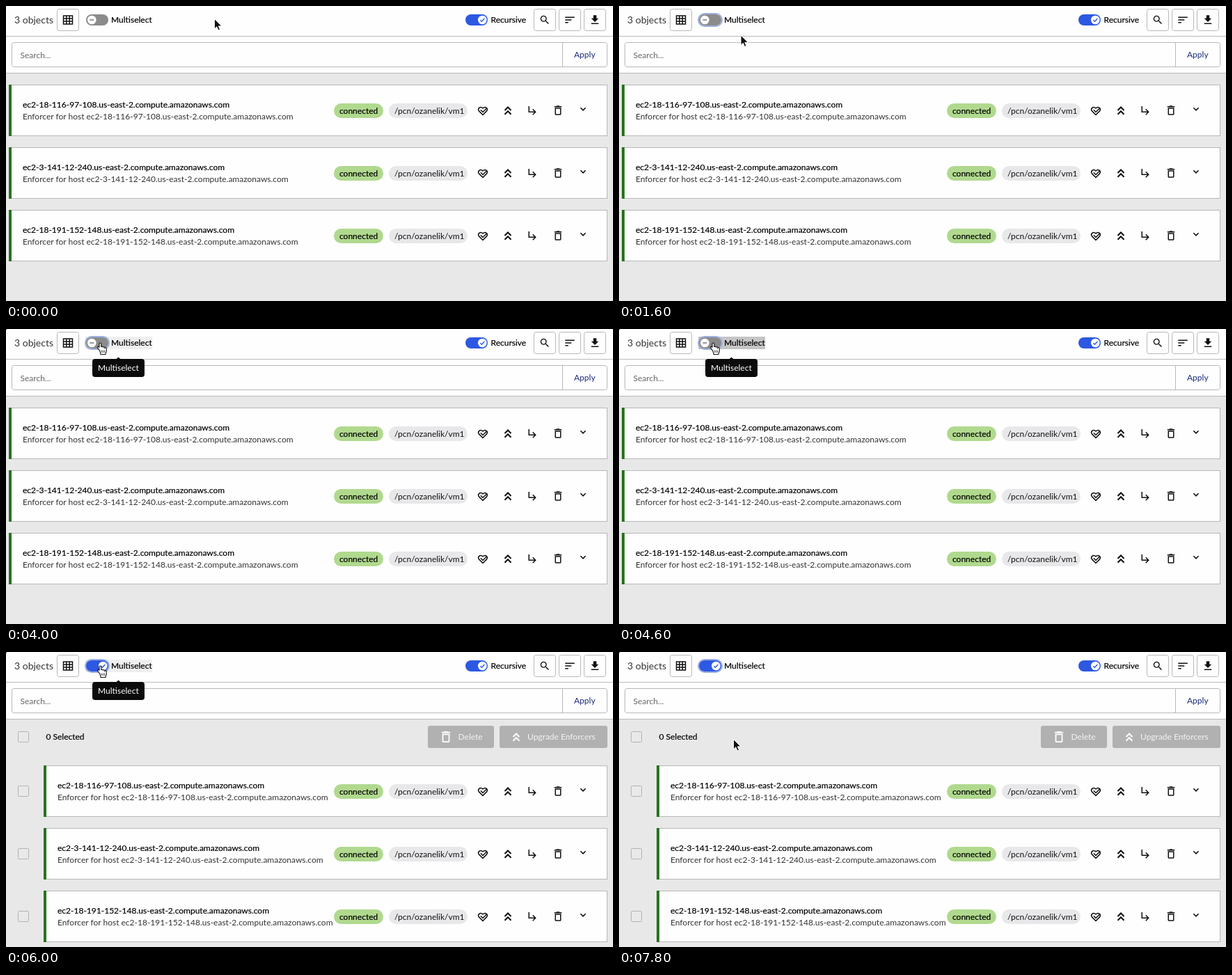
Animation of 872x424 px, one loop 8 s. Source, as an HTML page:

```html
<!DOCTYPE html>
<html lang="en">
<head>
<meta charset="utf-8">
<title>Multiselect toggle</title>
<style>
  html, body { margin: 0; width: 100%; height: 100%; overflow: hidden; background: #e8e8e8; }
  svg { display: block; width: 872px; height: 424px; }
  text { font: 12px Lato, sans-serif; white-space: pre; }
  .strong { stroke: #000; stroke-width: .2; }
  .line { fill: none; stroke: #111; }
  .box { fill: #fefefe; stroke: #b8b8b8; }
</style>
</head>
<body>
<svg id="stage" viewBox="0 0 872 424"></svg>
<script>
const LOOP = 8000, STEP = 200;

const ICONS = {
  search: 'M15.5 14h-.79l-.28-.27A6.47 6.47 0 0 0 16 9.5 6.5 6.5 0 1 0 9.5 16c1.61 0 3.09-.59 4.23-1.57l.27.28v.79l5 4.99L20.49 19l-4.99-5zm-6 0C7.01 14 5 11.99 5 9.5S7.01 5 9.5 5 14 7.01 14 9.5 11.99 14 9.5 14z',
  sort: 'M3 18h6v-2H3zM3 6v2h18V6zM3 13h12v-2H3z',
  download: 'M19 9h-4V3H9v6H5l7 7zM5 18v2h14v-2z',
  enter: 'M19 15l-6 6-1.42-1.42L15.17 16H4V4h2v10h9.17l-3.59-3.58L13 9z',
  trash: 'M16 9v10H8V9h8m-1.5-6h-5l-1 1H5v2h14V4h-3.5zM18 7H6v12c0 1.1.9 2 2 2h8c1.1 0 2-.9 2-2z'
};

const icon = (name, x, y, scale = .75, color = '#111') =>
  `<path d="${ICONS[name]}" fill="${color}" transform="translate(${x} ${y}) scale(${scale}) translate(-12 -12)"/>`;
const stroke = (d, x, y, width = 1.5, color = '#111') =>
  `<path d="${d}" class="line" style="stroke:${color}" stroke-width="${width}" transform="translate(${x} ${y})"/>`;
const rect = (x, y, w, h, r, attrs) =>
  `<rect x="${x}" y="${y}" width="${w}" height="${h}" rx="${r}" ${attrs}/>`;
const fill = (x, y, w, h, r, color) => rect(x, y, w, h, r, `fill="${color}"`);
const box = (x, y, w, h, r = 3) => rect(x + .5, y + .5, w - 1, h - 1, r, 'class="box"');
const label = (s, x, y, color = '#333') => `<text x="${x}" y="${y}" fill="${color}">${s}</text>`;
const strong = (s, x, y) => `<text x="${x}" y="${y}" class="strong">${s}</text>`;
const group = (id, body) => `<g id="${id}">${body}</g>`;

const DOUBLE_UP = 'M-4.5 0L0-4.5 4.5 0M-4.5 5.7L0 1.2 4.5 5.7';
const HEART = 'M0 6L-5.6.4C-8-2.6-4-7.2 0-3.6 4-7.2 8-2.6 5.6.4ZM-3.2-1.2L0 2 5-3';

const toggleOn = x => fill(x, 12, 32, 16, 8, '#2d58e2') +
  `<circle cx="${x + 24.3}" cy="20" r="6.3" fill="#fff"/>` +
  stroke('M-3 .2L-.9 2.2 3-2', x + 24.3, 20, 1.4, '#2d58e2');
const toggleOff = x => fill(x, 12, 32, 16, 8, '#8b8b8b') +
  `<circle cx="${x + 8.3}" cy="20" r="6.3" fill="#fff"/>` +
  stroke('M-3 0H3', x + 8.3, 20, 1.5, '#777');

function header() {
  return fill(0, 0, 872, 96, 0, '#fefefe') +
    fill(0, 43, 872, 1, 0, '#bcbcbc') + fill(0, 96, 872, 1, 0, '#b8b8b8') +
    `<text x="12" y="25" fill="#333" style="font-size:14px">3 objects</text>` +
    box(73, 4, 32, 32) +
    stroke('M-6.5-6H6.5V6H-6.5ZM-6.5-2H6.5M-6.5 2H6.5M-2.2-6V6M2.2-6V6', 89, 20, 1.5) +
    toggleOn(660) + strong('Recursive', 696.5, 24) +
    [758, 794, 830].map(x => box(x, 4, 32, 32)).join('') +
    icon('search', 774, 20, .7) + icon('sort', 810, 20) + icon('download', 846, 20) +
    box(8, 52, 856, 36) + fill(799, 53, 1, 34, 0, '#b8b8b8') +
    label('Search...', 20.5, 75, '#666') + label('Apply', 816, 74, '#1c2b7c');
}

function card(ip, i) {
  const y = 113 + 90 * i, mid = y + 37;
  const host = `ec2-${ip}.us-east-2.compute.amazonaws.com`;
  return `<g class="panel">${rect(.5, y + .5, 0, 73, 0, 'class="box"')}${fill(0, y, 4, 74, 0, '#27731f')}` +
    strong(host, 20, y + 33) + label('Enforcer for host ' + host, 20, y + 50) + '</g>' +
    fill(471, y + 27, 71, 21, 10.5, '#b0d98e') + strong('connected', 479, y + 42) +
    fill(550, y + 27, 113, 21, 10.5, '#e8e8ea') + label('/pcn/ozanelik/vm1', 558, y + 42, '#111') +
    stroke(HEART, 685, mid + .5, 1.5) + stroke(DOUBLE_UP, 721, mid, 2.1) +
    icon('enter', 756.5, mid) + icon('trash', 793, mid) +
    stroke('M-3.6-1.8L0 1.8 3.6-1.8', 829, mid - 2, 1.6);
}

function selectionBar() {
  const checks = [114, 192, 282, 372].map(y => rect(17.5, y + .5, 15, 15, 1, 'fill="#e9e9e9" stroke="#b3b3b3"'));
  return checks.join('') + strong('0 Selected', 57.5, 126) +
    fill(606, 106, 95, 32, 3, '#b1b1b1') + icon('trash', 632, 122, .9, '#fff') + label('Delete', 649.5, 126, '#f3f3f3') +
    fill(709, 106, 155, 32, 3, '#b1b1b1') + stroke(DOUBLE_UP, 733, 122, 2, '#fff') +
    label('Upgrade Enforcers', 749, 126, '#f3f3f3');
}

const tooltip = '<path d="M157.5 44l4-3.5 4 3.5z" fill="#0b0b0b"/>' +
  fill(124, 43, 75, 26, 4, '#0b0b0b') + label('Multiselect', 132, 60, '#fff');
const arrow = '<path d="M0 0V14.4L3.3 11.3 5.5 16.4 8 15.3 5.8 10.4H10.4Z" fill="#111" stroke="#fff"/>';
const hand = '<path d="M-1.5 11L-4 7.7C-5.5 5.5-3 4.5-2 6.5V1.5C-2-.5.8-.5.8 1.5V6C1 4.5 3.4 4.8 3.4 6.5 3.8 5.2 6 5.6 6 7.2 6.6 6.2 8.3 6.8 8.3 8.2V11.5C8.3 13 7 14 7 16.5H0C0 14.5-1 12.5-1.5 11Z" fill="#fff" stroke="#111" stroke-width="1.1"/>' +
  '<path d="M1.2 10.5V14M3.4 10.5V14M5.6 10.5V14" class="line" stroke-width=".8"/>';

const stage = document.getElementById('stage');
stage.innerHTML = header() +
  group('highlight', rect(114, 11, 96, 18, 0, '')) +
  group('ring', rect(114, 11, 34, 18, 9, 'fill="none" stroke="#9cb0e0" stroke-width="2"')) +
  group('off', toggleOff(115)) + group('on', toggleOn(115)) +
  strong('Multiselect', 151, 24) +
  group('list', ['18-116-97-108', '3-141-12-240', '18-191-152-148'].map(card).join('')) +
  group('bar', selectionBar()) + group('tip', tooltip) +
  group('corner', fill(0, 0, 1, 1, 0, '#000')) +
  group('cursor', group('arrow', arrow) + group('hand', hand));

const el = id => document.getElementById(id);
const show = (id, visible) => el(id).setAttribute('visibility', visible ? 'visible' : 'hidden');
const within = (t, from, to) => t >= from && t < to;

// Pointer keys: time, x, y
const PATH = [
  [0, 299.5, 18.5], [200, 290, 19], [800, 140, 20], [1200, 137, 20], [1600, 175, 42],
  [2200, 141, 23], [2600, 137, 20.5], [3200, 136, 20], [6800, 136, 20],
  [7000, 137, 25], [7200, 141.5, 47], [7600, 161, 116], [7800, 164.5, 125.5], [LOOP, 164.5, 125.5]
];

function pointer(t) {
  const i = PATH.findIndex(key => key[0] > t);
  const [t0, x0, y0] = PATH[i - 1], [t1, x1, y1] = PATH[i];
  const u = (t - t0) / (t1 - t0);
  return [x0 + (x1 - x0) * u, y0 + (y1 - y0) * u];
}

function draw(t) {
  const [x, y] = pointer(t);
  const hover = within(t, 800, 1400) || within(t, 2200, 7400);
  const pressed = t === 1200 || within(t, 4400, 4800);
  const selecting = t >= 4800;
  const onToggle = hover && y < 30;

  show('highlight', hover);
  el('highlight').setAttribute('fill', pressed ? '#c5c5c5' : '#efefef');
  show('ring', t >= 1200);
  show('off', !selecting);
  show('on', selecting);
  show('bar', selecting);
  show('tip', within(t, 1000, 1400) || within(t, 2400, 7400));
  show('corner', t >= 2800);

  el('list').setAttribute('transform', `translate(0 ${selecting ? 50 : 0})`);
  const left = selecting ? 54 : 4;
  for (const panel of document.querySelectorAll('.panel')) {
    panel.setAttribute('transform', `translate(${left} 0)`);
    panel.firstChild.setAttribute('width', 863 - left);
  }

  el('cursor').setAttribute('transform', `translate(${x} ${y})`);
  show('arrow', !onToggle);
  show('hand', onToggle);
}

function tick() {
  draw(Math.floor(performance.now() % LOOP / STEP) * STEP);
  requestAnimationFrame(tick);
}
tick();
</script>
</body>
</html>
```
